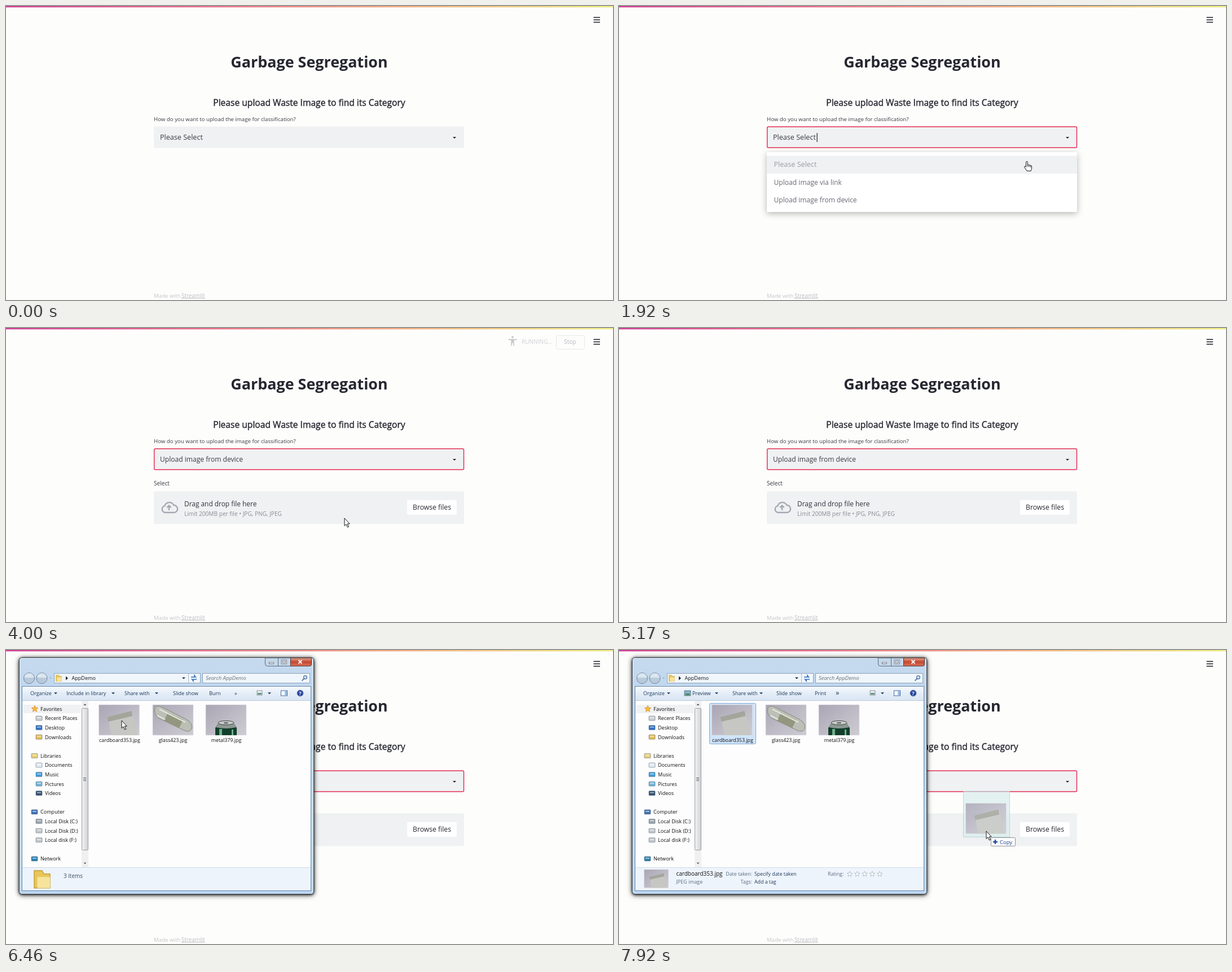
Write an HTML page that moves like this. It is 1076 by 521 pixels and loops after 8000 ms.

```html
<!DOCTYPE html>
<html lang="en">
<head>
<meta charset="utf-8">
<title>Garbage Segregation</title>
<style>
html, body { margin: 0; width: 100%; height: 100%; overflow: hidden; background: #fdfdfc; }
#stage { position: fixed; inset: 0; overflow: clip; contain: strict; }
svg { position: absolute; left: 0; top: 0; width: 1076px; height: 521px; overflow: hidden; }
text { font-family: "Open Sans", "Noto Sans", sans-serif; white-space: pre; }
#win { width: 560px; height: 450px; transform-origin: 0 0; filter: drop-shadow(0 1px 2px rgba(0,0,0,.7)) drop-shadow(0 1px 4px rgba(0,0,0,.6)); }
</style>
</head>
<body>
<div id="stage"><svg id="page"></svg><svg id="win"></svg><svg id="top"></svg></div>
<script>
const $ = id => document.getElementById(id);
const text = (x, y, size, str, fill = '#111', more = '') =>
  `<text x="${x}" y="${y}" font-size="${size}" fill="${fill}" ${more}>${str}</text>`;
const rect = (x, y, w, h, fill, more = '') =>
  `<rect x="${x}" y="${y}" width="${w}" height="${h}" fill="${fill}" ${more}/>`;
const path = (d, fill, more = '') => `<path d="${d}" fill="${fill}" ${more}/>`;
const circle = (x, y, r, fill, more = '') => `<circle cx="${x}" cy="${y}" r="${r}" fill="${fill}" ${more}/>`;
const group = (id, body, more = '') => `<g id="${id}" ${more}>${body}</g>`;
const at = (x, y, body, scale = 1) => `<g transform="translate(${x} ${y}) scale(${scale})">${body}</g>`;
const down = (x, y, fill = '#222', r = 3) => path(`M${x - r} ${y - r / 2}h${2 * r}l${-r} ${r}z`, fill);
const grad = (id, stops, dir = 'x2="0" y2="1"') => `<linearGradient id="${id}" ${dir}>` +
  stops.map((c, i) => `<stop offset="${i / (stops.length - 1)}" stop-color="${c}"/>`).join('') + '</linearGradient>';

// ---- web page
const ink = '#262730', grey = '#9a9ca6', field = '#eff1f2', red = '#e62f56';
$('page').innerHTML =
  grad('bar', ['#cf3f92', '#e8708a', '#f2b184', '#ecec84'], '') +
  rect(0, 0, 1076, 2.4, 'url(#bar)') +
  [20.3, 24.5, 28.7].map(y => rect(1041.5, y - .8, 11.5, 1.6, ink)).join('') +
  text(537.5, 109, 26.9, 'Garbage Segregation', ink, 'text-anchor="middle" font-weight="700"') +
  text(537.5, 177, 15.6, 'Please upload Waste Image to find its Category', ink, `text-anchor="middle" stroke="${ink}" stroke-width=".4"`) +
  text(262, 203.5, 9.7, 'How do you want to upload the image for classification?', '#3a3b44') +
  rect(262, 213.5, 550, 38, field, 'rx="2"') +
  rect(262.7, 214, 548.8, 37, 'none', `id="focus" rx="2" stroke="${red}" stroke-width="1.5"`) +
  text(273, 237, 12.6, 'Please Select', '#3a3b44', 'id="none"') +
  text(273, 237, 12.05, 'Upload image from device', '#3a3b44', 'id="device"') +
  rect(350.6, 225, 1.1, 16, '#111', 'id="caret"') +
  down(795, 233.4) +
  group('upload',
    text(262, 278.5, 10.1, 'Select', '#3a3b44') +
    rect(262, 289.5, 550, 58, field, 'rx="2"') +
    path('M282 327a6 6 0 0 1-.6-11.8a8.6 8.6 0 0 1 16-1.2a5.6 5.6 0 0 1 .4 13zM289 323v-8m-3.6 3.2l3.6-3.6l3.6 3.6', 'none', 'stroke="#a3a8b4" stroke-width="2.4"') +
    text(316, 316, 11.9, 'Drag and drop file here', '#31333f') +
    text(316, 332.5, 10.15, 'Limit 200MB per file • JPG, PNG, JPEG', '#8a8c95') +
    rect(711, 305, 88, 26, '#fff', 'rx="2"') +
    text(755, 322, 12.2, 'Browse files', ink, 'text-anchor="middle"')) +
  group('running',
    circle(898, 16, 1.9, '#c8c9cc') +
    path('M890.5 19.6h15v1.8h-4.8v10h-1.7v-5h-2v5h-1.7v-10h-4.8z', '#c8c9cc') +
    text(914, 28, 10.1, 'RUNNING...', '#cfd0d3') +
    rect(975.5, 13.5, 50, 24, 'none', 'rx="2" stroke="#e6e7ea"') +
    text(1000, 27.5, 10.3, 'Stop', '#b4b6bc', 'text-anchor="middle"')) +
  text(262, 516.5, 9.7, 'Made with', '#c4c5ca') +
  text(311, 516.5, 9.95, 'Streamlit', '#bdbec4', 'text-decoration="underline"') +
  group('menu',
    rect(262, 259, 550, 106, '#fff', 'rx="2"') +
    [0, 1, 2].map(i => rect(262, 265.5 + 31.4 * i, 550, 31.4, field, `id="row${i}"`)).join('') +
    text(274.5, 285, 12.6, 'Please Select', grey) +
    text(274.5, 316.7, 12.1, 'Upload image via link', '#666872') +
    text(274.5, 348, 12.05, 'Upload image from device', '#666872'),
    'style="filter:drop-shadow(0 3px 6px rgba(0,0,0,.28))"');

// ---- photos, each 72 x 54
const backdrop = rect(0, 0, 72, 54, 'url(#wall)', 'stroke="#e4e4ea" stroke-width=".6"');
const photos = [
  backdrop + path('M17 25l43-11l9 40h-47z', '#c6c7c3') + path('M15 22l43-11l2 9l-43 10z', '#a4a59b'),
  backdrop + path('M4 6q4-6 12-2l44 22q12 7 9 17q-4 7-14 2l-44-21q-10-7-7-18z', '#bcbfb5', 'stroke="#84877f"') +
    path('M27 14l27 13l-7 14l-27-13z', '#94977f') + path('M12 8l46 23M8 19l14 7', 'none', 'stroke="#e3e6de" stroke-width="2.5"'),
  backdrop + path('M17 54v-13l6-9h26l6 9v13z', '#123f2c') + path('M18 40l5-8h26l5 8q-18 4-36 0z', '#8d9893') +
    path('M24 54v-11h5v11zM46 54v-10h3v10z', '#6fae8c') +
    `<ellipse cx="36" cy="32" rx="14" ry="3.600" fill="#c9cccb" stroke="#3d4341"/>` + rect(32, 31, 8, 2.4, '#626967', 'rx="1.2"')
];

// ---- file window
const face = 9.05, say = (x, y, s, fill, size = face, more) => text(x, y + 3.3, size, s, fill, more);
const star = (x, y, r, fill, stroke) => path('M' + [...Array(10).keys()].map(i => {
  const a = i * Math.PI / 5, q = i % 2 ? r * .45 : r;
  return (x + q * Math.sin(a)).toFixed(1) + ' ' + (y - q * Math.cos(a)).toFixed(1);
}).join('L') + 'z', fill, `stroke="${stroke}" stroke-width=".8"`);
const box = (x, y, c) => rect(x, y - 4, 11, 8, c, 'rx="1" stroke="#6b7885" stroke-width=".6"') + rect(x + 2, y - 2, 7, 2, '#fff', 'opacity=".55"');
const folder = (x, y, s = 1) => at(x, y, path('M0 0h5l1 2h4v9h-10z', '#e8c65a', 'stroke="#c29a35" stroke-width=".5"') + path('M2 4h8v7h-8z', '#f7e49b'), s);
// row index, label, icon colour
const tree = [[0, 'Favorites'], [1, 'Recent Places', '#c9cdd0'], [2, 'Desktop', '#2f6fc4'], [3, 'Downloads', '#e2bb52'],
  [5, 'Libraries', '#e6cd75'], [6, 'Documents', '#dfe9f2'], [7, 'Music', '#3b9ad8'], [8, 'Pictures', '#6fb3d8'], [9, 'Videos', '#33506e'],
  [11, 'Computer', '#3c6fb5'], [12, 'Local Disk (C:)', '#9aa2a8'], [13, 'Local Disk (D:)', '#c2c6c9'], [14, 'Local disk (F:)', '#c2c6c9'], [16, 'Network', '#2a7fb0']];
const heads = [0, 5, 11, 16];
const tool = (x, s, arrow) => say(x, 76.5, s, '#1e395b') + (arrow ? down(arrow, 76.7, '#1e395b') : '');

$('win').innerHTML =
  grad('wall', ['#a9a5b4', '#bdbac5', '#cdcbd2'], 'x2="1" y2="1"') +
  grad('glass', ['#c6daee', '#b6d2f0', '#bfd9f4', '#b8d5f3']) +
  grad('strip', ['#f7fafd', '#e4edf7', '#dae6f3']) +
  grad('close', ['#e3a493', '#c4472f', '#d8745c']) +
  grad('thumb', ['#f4f4f5', '#cfd1d4'], 'x2="1"') +
  rect(23.5, 13.5, 522, 419, 'url(#glass)', 'rx="5" stroke="#2b3440"') +
  rect(24.5, 14.5, 520, 417, 'none', 'rx="4" stroke="#eef6fd" opacity=".8"') +
  path('M459.5 14v11q0 3.5 4 3.5h74q4 0 4-3.5v-11z', '#c5d8ea', 'stroke="#5c6b7b"') +
  path('M504.5 14h37v11q0 3.5-4 3.5h-33z', 'url(#close)', 'stroke="#5c3530"') +
  path('M482.5 14v14', 'none', 'stroke="#5c6b7b"') +
  rect(466.5, 22, 8, 2.5, '#fff', 'stroke="#445" stroke-width=".7"') +
  rect(489, 18, 7.5, 6, 'none', 'stroke="#445" stroke-width="2.4"') + rect(489, 18, 7.5, 6, 'none', 'stroke="#fff" stroke-width="1.2"') +
  path('M518.5 18l6 6m0-6l-6 6', 'none', 'stroke="#fff" stroke-width="1.8"') +
  circle(41, 50, 9.5, '#b9cadb', 'stroke="#75889c"') + circle(63.5, 50, 9.5, '#b9cadb', 'stroke="#75889c"') +
  path('M32.5 49a8.5 8 0 0 1 17 0zM55 49a8.5 8 0 0 1 17 0z', '#dbe6f0') + down(79, 50, '#a5b5c6', 2.5) +
  rect(85.5, 41.5, 259, 17, '#f0f6fc', 'stroke="#8fa3b8"') + folder(88.5, 44.5) +
  path('M106 46.5l4 3.5l-4 3.5z', '#222') + say(116.5, 50, 'AppDemo') + down(315, 50) +
  path('M323.5 42v16', 'none', 'stroke="#a9bace"') +
  path('M328 48h6v-3l3 4M338 52h-6v3l-3-4', 'none', 'stroke="#2d6fb8" stroke-width="1.5"') +
  rect(348.5, 41.5, 190, 17, '#f0f6fc', 'stroke="#8fa3b8"') + say(354, 49.7, 'Search AppDemo', '#6d7177', 9.5, 'font-style="italic"') +
  circle(530.5, 48.5, 2.8, 'none', 'stroke="#3f6aa0" stroke-width="1.3"') + path('M528.5 50.5l-4 4', 'none', 'stroke="#3f6aa0" stroke-width="1.7"') +
  rect(28.5, 64.5, 512, 362, '#fdfdfd', 'stroke="#6f8aa8"') +
  rect(29, 65, 511, 24, 'url(#strip)') + rect(29, 89, 511, 1, '#b7c7d9') +
  tool(43, 'Organize', 88) +
  group('plainBar', tool(107, 'Include in library', 190) + tool(210, 'Share with', 267) + tool(296, 'Slide show') + tool(360, 'Burn') + tool(405, '»')) +
  group('fileBar', rect(116, 72, 11, 9, '#7fb4cf', 'stroke="#456" stroke-width=".7"') + rect(118, 77, 7, 3, '#4e8a56') +
    tool(130, 'Preview', 173) + tool(201, 'Share with', 252) + tool(279, 'Slide show') + tool(347, 'Print') + text(384, 80, 13, '»', '#1e395b')) +
  rect(445, 72, 9, 8, '#e8eef4', 'stroke="#778" stroke-width=".8"') + rect(446, 76, 7, 3, '#5f9c78') + down(467, 76.7, '#1e395b') +
  rect(487.5, 72, 11, 9, '#fff', 'stroke="#3f6aa0"') + rect(494, 73, 4, 7, '#9cc0e4') +
  circle(521.5, 76.5, 5.8, '#26459c', 'stroke="#b7c3da"') + text(521.5, 80, 9.5, '?', '#fff', 'text-anchor="middle" font-weight="700"') +
  rect(30, 97, 103, 15, '#f0f1f3', 'rx="2"') +
  tree.map(([i, name, c]) => {
    const y = 104.4 + 16.6 * i, main = heads.includes(i);
    return (i ? box(main ? 45 : 53, y, c) : star(51, y, 6, '#f6b93b', '#d98a1e')) + say(main ? 61 : 69, y, name);
  }).join('') +
  rect(134, 90, 12, 295, '#f0f0f1') + rect(134.5, 103.5, 11, 251, 'url(#thumb)', 'rx="1" stroke="#9b9da1"') +
  [226, 228.5, 231].map(y => rect(137, y, 5, 1, '#667')).join('') +
  path('M137.5 98l2.5-3l2.5 3z', '#555') + down(140, 378, '#555', 2.5) +
  rect(160.5, 94.5, 82, 72, '#cfe4fa', 'id="chosen" rx="2" stroke="#7fa9d6"') +
  photos.map((p, i) => at([164.5, 260, 354][i], 97, p)).join('') +
  ['cardboard353.jpg', 'glass423.jpg', 'metal379.jpg'].map((s, i) =>
    say([201.5, 296, 390.5][i], 159.5, s, '#111', 8.9, 'text-anchor="middle"')).join('') +
  rect(29, 385, 511, 41, '#eef4fb') + rect(29, 385, 511, 1, '#cfdcea') +
  group('plainInfo', folder(50, 391, 2.8) + say(102, 401, '3 items', '#3b4d63', 10)) +
  group('fileInfo', at(44.5, 389, photos[0], .6) + say(101.5, 396.5, 'cardboard353.jpg', '#111', 10) +
    say(101.5, 411, 'JPEG image', '#5a6b80', 8.9) +
    say(236, 397, 'Date taken:', '#5a6b80', 8.8, 'text-anchor="end"') + say(240, 397, 'Specify date taken', '#1e395b', 8.8) +
    say(236, 411, 'Tags:', '#5a6b80', 8.8, 'text-anchor="end"') + say(240, 411, 'Add a tag', '#1e395b', 8.8) +
    say(370, 397, 'Rating:', '#5a6b80', 8.8) + [0, 1, 2, 3, 4].map(i => star(409 + 13.3 * i, 397, 5, '#f8fafc', '#a9b1ba')).join(''));

// ---- dragged file and cursors
const outline = 'stroke="#111" stroke-width="1" stroke-linejoin="round"';
$('top').innerHTML =
  group('ghost', rect(0, 0, 82, 81, '#d9eeee', 'opacity=".75" stroke="#a9c8cc"') + at(4, 21, `<g id="shot">${photos[0]}</g>`)) +
  group('cursor',
    group('arrow', path('M0 0v13.5l3.1-2.7l2.3 5.3l2.2-.9l-2.3-5.2h4z', '#fff', outline)) +
    group('beam', path('M-4 -6.5h3.2l.8.8l.8-.8h3.2M0 -5.7v11.4M-4 6.5h3.2l.8-.8l.8.8h3.2', 'none', 'stroke="#444"')) +
    group('hand', path('M-1.3 9.5v-8.5q0-1.5 1.4-1.5t1.4 1.5v5q1.6-1.3 2.6.3q1.7-1 2.5.5q2-.6 2.1 1.5v4.2l-1.5 4h-7l-4.2-6.5q-.8-1.8.6-2.1q1 0 2.1 1.6z', '#fff', outline) +
      path('M1.5 6v3M4.1 6.5v3M6.6 7v3', 'none', outline)) +
    group('copy', rect(8.5, 11.5, 43, 15, '#fdfdfd', 'rx="1" stroke="#8f9298"') +
      path('M12 19h8m-4-4v8', 'none', 'stroke="#1d4fa8" stroke-width="2.4"') + text(24, 22.7, 9.5, 'Copy', '#1f3f94')));

// time, x, y, cursor shape
const track = [
  [130, 782, 236, 'beam'], [750, 782, 236, 'arrow'], [790, 782, 236, 'beam'], [1700, 782, 236, 'beam'],
  [1800, 750, 262, 'hand'], [2290, 640, 318, 'hand'], [2340, 640, 318, 'hand'], [2520, 600, 337, 'hand'],
  [3880, 600, 337, 'arrow'], [4460, 600, 337, 'arrow'], [4630, 585, 360, 'arrow'], [4790, 585, 360, 'arrow'],
  [5170, 150, 545, 'arrow'], [5670, 115, 545, 'arrow'], [5800, 112, 470, 'hand'], [5950, 109, 334, 'hand'],
  [5990, 109, 334, 'hand'], [6130, 140, 260, 'arrow'], [6460, 205, 125, 'arrow'], [6880, 205, 125, 'arrow'],
  [7040, 251, 139, 'arrow'], [7085, 640, 268, 'arrow'], [7340, 640, 268, 'arrow'], [7900, 651, 321, 'arrow'], [8000, 651, 321, 'arrow']];
const clamp = v => Math.max(0, Math.min(1, v));
const ramp = (t, a, b) => clamp((t - a) / (b - a));
const mix = (a, b, k) => a + (b - a) * k;
const fade = (id, v) => $(id).style.opacity = +v;
const closed = [.610, .0302, .0000975, -.0034, .548, -.0000648, 52, 227];
const opened = [1, 0, 0, 0, 1, 0, 23, 13];

function draw(t) {
  const picked = t >= 3880, open = t >= 1500 && !picked;
  fade('focus', t >= 1500);
  fade('none', !picked);
  fade('device', picked);
  fade('caret', open && Math.floor(t / 500) % 2);
  fade('upload', t >= 3920);
  fade('running', t >= 3920 ? 1 - ramp(t, 4040, 4170) : 0);
  fade('menu', open ? ramp(t, 1460, 1640) : 0);
  const second = ramp(t, 1980, 2140), third = ramp(t, 2440, 2640);
  fade('row0', 1 - second);
  fade('row1', second * (1 - third));
  fade('row2', third);

  const k = 1 - (1 - ramp(t, 5960, 6150)) ** 2, early = ramp(t, 5880, 5960);
  const [a, d, g, b, e, h, x, y] = closed.map((v, i) => mix(v, opened[i], k));
  $('win').style.transform = `matrix3d(${a},${d},0,${g},${b},${e},0,${h},0,0,1,0,${x},${y + 30 * (1 - early)},0,1) translate(-23px,-13px)`;
  fade('win', early * mix(.58, 1, k));
  const chosen = t >= 6500;
  for (const id of ['chosen', 'fileBar', 'fileInfo']) fade(id, chosen);
  for (const id of ['plainBar', 'plainInfo']) fade(id, !chosen);

  const next = track.findIndex(p => p[0] > t), on = next > 0;
  fade('cursor', on);
  let cx = 0, cy = 0;
  if (on) {
    const p = track[next - 1], q = track[next], f = ramp(t, p[0], q[0]);
    cx = mix(p[1], q[1], f);
    cy = mix(p[2], q[2], f);
    $('cursor').setAttribute('transform', `translate(${cx} ${cy})`);
    for (const id of ['arrow', 'beam', 'hand']) fade(id, id === p[3]);
  }
  // the dragged image lingers inside the window before it catches up
  const lag = t > 7040 && t < 7290;
  $('ghost').setAttribute('transform', lag ? 'translate(210.5 68.5)' : `translate(${cx - 40.5} ${cy - 70.5})`);
  fade('ghost', t < 6880 ? 0 : lag ? .55 * (1 - ramp(t, 7100, 7240)) : t < 7290 ? .55 : .95);
  fade('shot', lag ? .25 : .9);
  fade('copy', t >= 7340);
}
(function loop() {
  draw(performance.now() % 8000);
  requestAnimationFrame(loop);
})();
</script>
</body>
</html>
```
